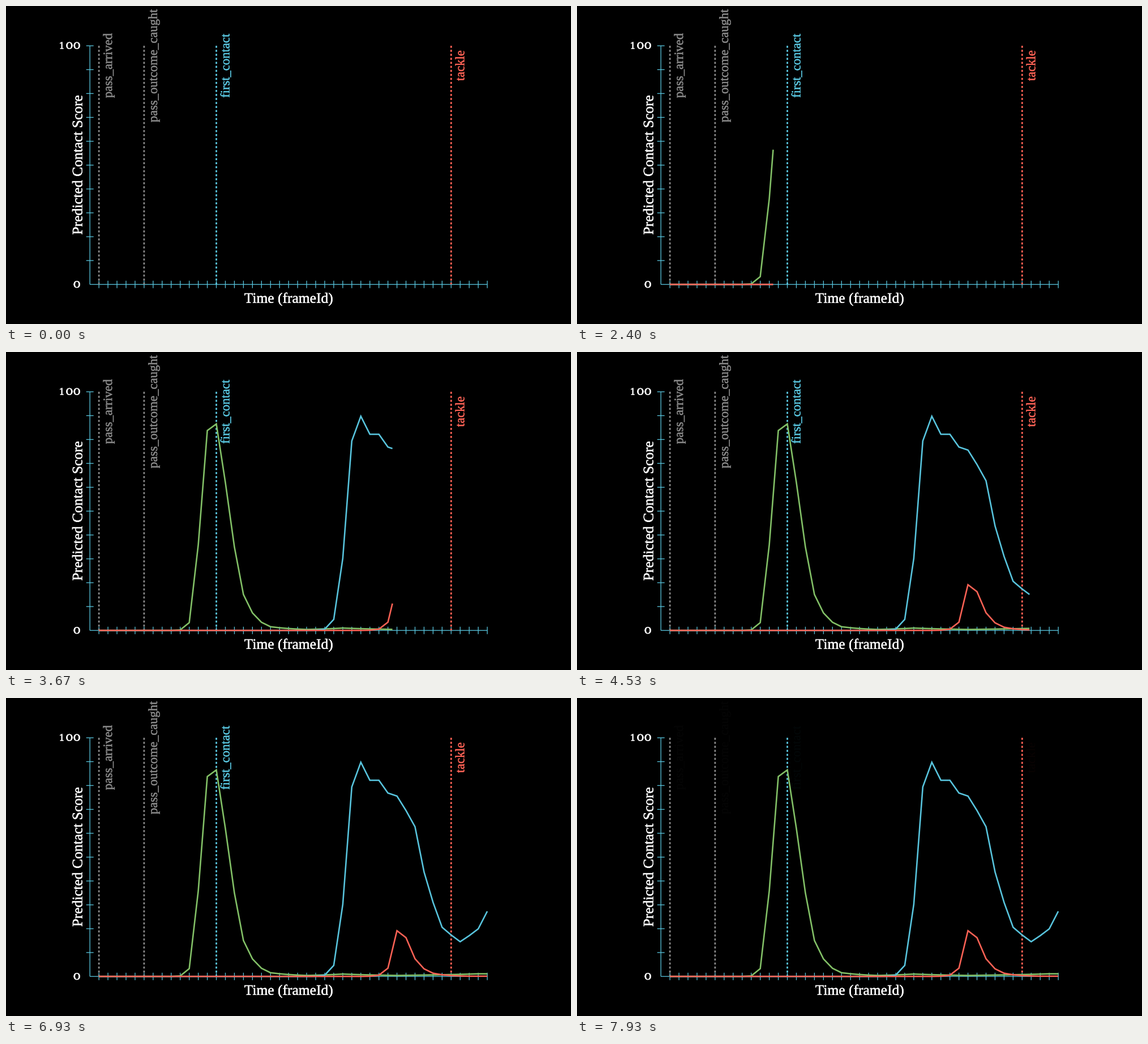
A matplotlib script for the animation above (8 s loop, 998 by 561 pixels).

```python
import numpy as np
import matplotlib.pyplot as plt
from matplotlib.animation import FuncAnimation
from matplotlib.patheffects import withStroke

W, H, DPI = 998, 561, 64
PT = 72 / DPI                      # points per pixel
FRAMES, LOOP = 120, 8000
DRAW, FADE_AT, FADE = 6.0, 7.0, 1.0

BLUE, GREEN, RED, GRAY = "#58C4DD", "#83C167", "#FC6255", "#888888"
X0, X1, Y0, Y1 = 148.2, 850.1, 491.2, 70.2
STEPS, TICK = 44, 6.5

fig = plt.figure(figsize=(W / DPI, H / DPI), dpi=DPI, facecolor="black")
ax = fig.add_axes([0, 0, 1, 1])
ax.set_xlim(0, W)
ax.set_ylim(H, 0)
ax.axis("off")


def px(k):
    return X0 + (X1 - X0) * np.asarray(k) / STEPS


def py(score):
    return Y0 + (Y1 - Y0) * np.asarray(score) / 100


def line(xs, ys, color, width, **kw):
    return ax.plot(xs, ys, color=color, lw=width * PT, snap=False,
                   solid_capstyle="butt", dash_capstyle="butt", **kw)[0]


def text(x, y, s, size, color="white", ha="center", angle=0, font="Liberation Serif"):
    return ax.text(x, y, s, fontsize=size * PT, color=color, ha=ha, va="baseline",
                   rotation=angle, rotation_mode="anchor", family=font,
                   path_effects=[withStroke(linewidth=0.4 * PT, foreground=color)])


def sigmoid(v):
    return 1 / (1 + np.exp(-v))


def smooth(u):
    e = sigmoid(-5)
    return np.clip((sigmoid(10 * (u - 0.5)) - e) / (1 - 2 * e), 0, 1)


# Axes
line([X0, X1], [Y0, Y0], BLUE, 1.3)
line([X0, X0], [Y0, Y1], BLUE, 1.3)
for k in range(1, STEPS + 1):
    line([px(k)] * 2, [Y0 - TICK, Y0 + TICK], BLUE, 1.3)
for score in range(10, 101, 10):
    line([X0 - TICK, X0 + TICK], [py(score)] * 2, BLUE, 1.3)

# Old-style numerals: x-height one and round zeros
NUM = "DejaVu Serif"
text(103.8, 75.5, "1", 16, ha="right", font=NUM)
text(131.8, 75.5, "oo", 22, ha="right", font=NUM)
text(131.8, 496.8, "o", 22, ha="right", font=NUM)
text(499.3, 523.6, "Time (frameId)", 25.5)
text(134.6, 280.3, "Predicted Contact Score", 25.5, angle=90)

EVENTS = [(1, "pass_arrived", GRAY), (6, "pass_outcome_caught", GRAY),
          (14, "first_contact", BLUE), (40, "tackle", RED)]
DASH, DOT = 3.54, 2.8
labels = []
for k, name, color in EVENTS:
    line([px(k)] * 2, [Y1, Y0], color, DOT, linestyle=(0, (DASH / DOT, DASH / DOT)))
    labels.append(text(px(k) + 23, 105, name, 22.6, color, angle=90))

# Scores are logistic: straight runs of log-odds between turning points
TURNS = {
    GREEN: [(9, -9), (12, -.58), (13, 1.64), (14, 1.86), (15, .49), (17, -1.73),
            (20, -4.15), (24, -5.5), (28, -4.6), (34, -5.5), (43, -4.5)],
    BLUE: [(24, -9.6), (29, 1.35), (30, 2.17), (31, 1.53), (32, 1.53), (33, 1.2),
           (34, 1.13), (36, .52), (37, -.25), (39, -1.35), (41, -1.77), (43, -1.39),
           (44, -.98)],
    RED: [(30, -9), (34, -1.44), (35, -1.64), (38, -4.3), (42, -6.9)],
}
steps = np.arange(1, STEPS + 1)
curves = []
for color, turns in TURNS.items():
    scores = 100 * sigmoid(np.interp(steps, *zip(*turns)))
    art = line([], [], color, 2.6, solid_joinstyle="miter", zorder=3)
    curves.append((art, scores))


def draw(i):
    t = i * LOOP / FRAMES / 1000
    tip = 1 + (STEPS - 1) * smooth(min(t / DRAW, 1))
    ks = np.append(steps[steps < tip], tip)
    for art, scores in curves:
        art.set_data(px(ks), py(np.interp(ks, steps, scores)))
    alpha = 1 - smooth(max(t - FADE_AT, 0) / FADE)
    for label in labels:
        label.set_alpha(alpha)
    return [art for art, _ in curves] + labels


anim = FuncAnimation(fig, draw, frames=FRAMES, interval=LOOP / FRAMES,
                     init_func=lambda: draw(0), repeat=True, repeat_delay=0,
                     cache_frame_data=False)
plt.show()
```
